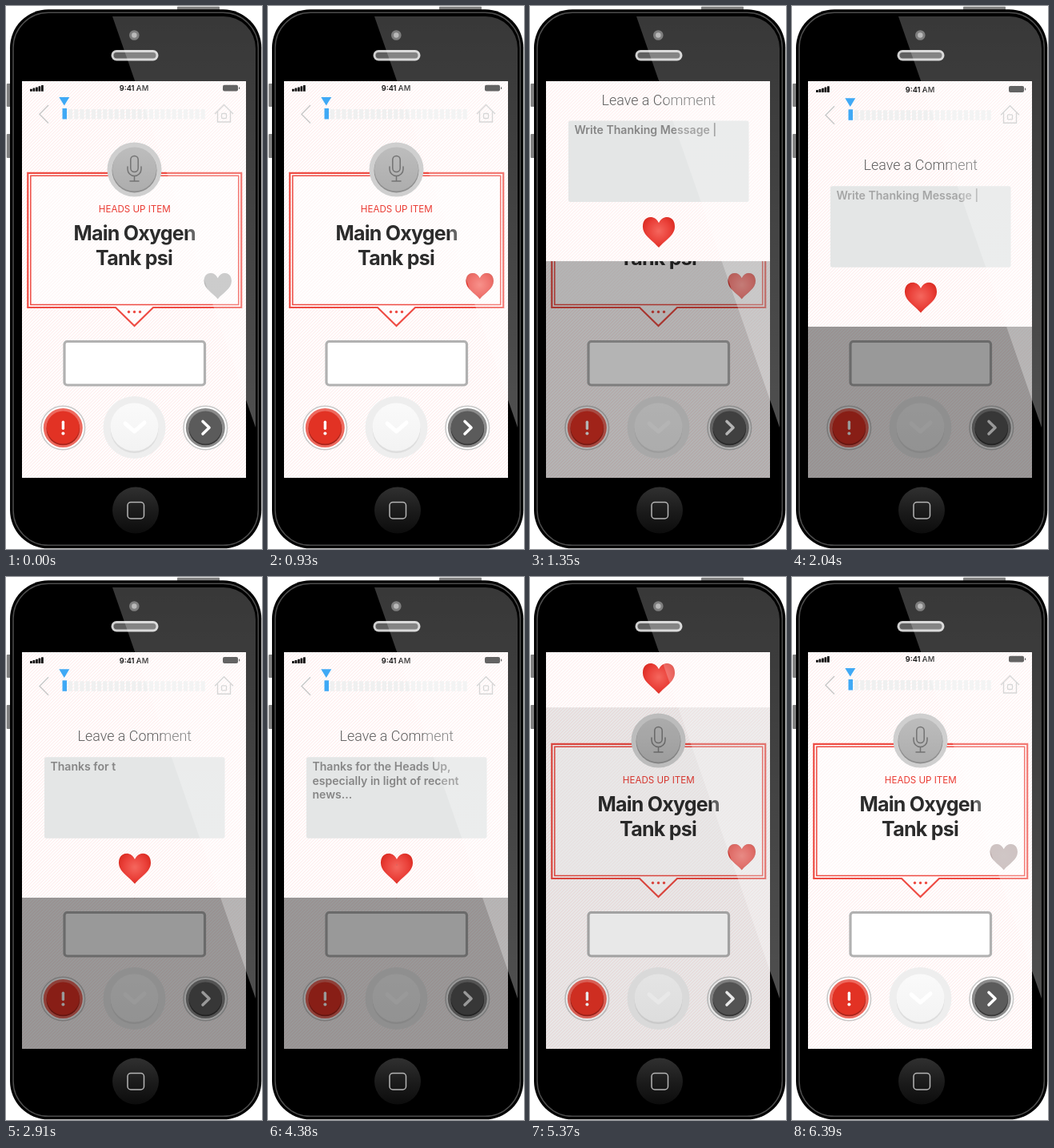
These frames come from a looping animation (320x679 px, 6570 ms). An HTML page with a canvas:

```html
<!DOCTYPE html>
<html lang="en">
<head>
<meta charset="utf-8">
<title>Thank-you comment</title>
<style>
  html, body { margin: 0; width: 100%; height: 100%; overflow: hidden; background: #fff; }
  canvas { display: block; width: 320px; height: 679px; }
</style>
</head>
<body>
<canvas id="stage" width="320" height="679"></canvas>
<script>
const ctx = document.getElementById('stage').getContext('2d');
const LOOP = 6570, TICK = 30;
const SCREEN = { x: 20, y: 94, w: 280, h: 496 };
const PANEL_BOTTOM = 401;
const HATCH_PITCH = 4;
const RED = '#ee4b43', BLUE = '#3fa9f5';
const PLACEHOLDER = 'Write Thanking Message |';
const MESSAGE = 'Thanks for the Heads Up,\nespecially in light of recent\nnews...';

const clamp = v => Math.min(1, Math.max(0, v));
const ramp = (t, from, to) => clamp((t - from) / (to - from));
const smooth = u => u * u * (3 - 2 * u);

function fillOrStroke(fill, stroke, width) {
  if (fill) { ctx.fillStyle = fill; ctx.fill(); }
  if (stroke) { ctx.strokeStyle = stroke; ctx.lineWidth = width; ctx.stroke(); }
}
function box(x, y, w, h, r, fill, stroke, width) {
  ctx.beginPath();
  ctx.roundRect(x, y, w, h, r);
  fillOrStroke(fill, stroke, width);
}
function disc(x, y, r, fill, stroke, width) {
  ctx.beginPath();
  ctx.arc(x, y, r, 0, Math.PI * 2);
  fillOrStroke(fill, stroke, width);
}
function poly(points, fill, stroke, width, closed) {
  ctx.beginPath();
  points.forEach(([x, y]) => ctx.lineTo(x, y));
  if (closed) ctx.closePath();
  fillOrStroke(fill, stroke, width);
}
function vertical(y0, y1, ...stops) {
  const g = ctx.createLinearGradient(0, y0, 0, y1);
  stops.forEach((c, i) => g.addColorStop(i / (stops.length - 1), c));
  return g;
}
function text(str, x, y, font, color, align = 'center', tracking = '0px') {
  ctx.font = font;
  ctx.letterSpacing = tracking;
  ctx.fillStyle = color;
  ctx.textAlign = align;
  ctx.fillText(str, x, y);
}

function hatchedPaper(bottom) {
  const { x, y, w } = SCREEN;
  ctx.save();
  ctx.beginPath();
  ctx.rect(x, y, w, bottom - y);
  ctx.clip();
  ctx.fillStyle = '#fffdfd';
  ctx.fillRect(x, y, w, bottom - y);
  ctx.beginPath();
  for (let c = x + y; c < x + w + bottom; c += HATCH_PITCH) {
    ctx.moveTo(c - y, y);
    ctx.lineTo(c - bottom, bottom);
  }
  fillOrStroke(null, 'rgba(238,75,67,.1)', 1);
  ctx.restore();
}

function heart(cx, top, w, h, fill) {
  const notch = top + h * .19;
  ctx.beginPath();
  for (const r of [w / 2, -w / 2]) {
    ctx.moveTo(cx, notch);
    ctx.bezierCurveTo(cx + r * .12, top + h * .06, cx + r * .3, top, cx + r * .52, top);
    ctx.bezierCurveTo(cx + r * .82, top, cx + r, top + h * .13, cx + r, top + h * .31);
    ctx.bezierCurveTo(cx + r, top + h * .6, cx + r * .38, top + h * .76, cx, top + h);
    ctx.closePath();
  }
  fillOrStroke(fill);
}
function redHeart(cx, top, w, h) {
  const g = ctx.createRadialGradient(cx, top + h * .45, 1, cx, top + h * .45, w * .58);
  g.addColorStop(0, '#f4645b');
  g.addColorStop(.6, '#ea4039');
  g.addColorStop(1, '#d9291f');
  heart(cx, top, w, h, g);
}

function header() {
  for (let i = 0; i < 5; i++) {
    const h = 3 + i * 1.2;
    box(30 + i * 3.5, 106.8 - h, 2.8, h, .5, '#111');
  }
  text('9:41 AM', 160, 106.3, '600 9.3px Inter, sans-serif', '#111');
  box(271, 98.8, 19, 7.8, 2, '#333');
  box(291, 101.3, 1.2, 2.8, .6, '#333');

  ctx.lineJoin = 'miter';
  poly([[53, 124], [42, 135.3], [53, 146.5]], null, '#c9c9c9', 1.5);
  poly([[66.3, 114], [79.3, 114], [72.8, 124.6]], BLUE, null, 0, true);
  box(70.5, 128, 5.5, 13.5, 0, BLUE);
  for (let i = 0; i < 24; i++) box(78 + i * 7.2, 129, 5.2, 12.5, 0, '#eff0f0');
  poly([[261, 135], [272.5, 123.5], [284, 135]], null, '#cacaca', 1.4);
  poly([[264.5, 132], [264.5, 145], [280.5, 145], [280.5, 132]], null, '#cacaca', 1.4);
  box(269.5, 134.5, 6, 6, 1, null, '#cacaca', 1.3);
}

function microphone() {
  const ink = '#737373';
  disc(160.5, 204.5, 34, '#cfcfcf');
  disc(160.5, 205.5, 28, '#8f8f8f');
  disc(160.5, 204, 27.5, vertical(176, 232, '#bdbdbd', '#adadad'));
  ctx.lineCap = 'round';
  box(155.8, 187.5, 9.4, 20, 4.7, null, ink, 1.5);
  ctx.beginPath();
  ctx.moveTo(152, 201);
  ctx.lineTo(152, 204);
  ctx.arc(160.5, 204, 8.5, Math.PI, 0, true);
  ctx.lineTo(169, 201);
  ctx.moveTo(160.5, 212.5);
  ctx.lineTo(160.5, 219);
  ctx.moveTo(155, 219);
  ctx.lineTo(166, 219);
  fillOrStroke(null, ink, 1.5);
  ctx.lineCap = 'butt';
}

function card() {
  ctx.lineJoin = 'miter';
  poly([[27.3, 208.8], [294.2, 208.8], [294.2, 377], [184, 377], [160.5, 400], [137, 377], [27.3, 377]],
    'rgba(255,255,255,.5)', RED, 2.2, true);
  box(30.8, 212.3, 259.9, 161.2, 0, null, RED, 1.5);
  for (const x of [153.5, 160.5, 167.5]) disc(x, 382.5, 1.7, RED);
  microphone();
  text('HEADS UP ITEM', 160.8, 258.3, '11.6px Inter, sans-serif', '#ea3a32');
  const title = '700 25px Inter, sans-serif';
  text('Main Oxygen', 160.6, 293, title, '#2c2c2c', 'center', '-0.03em');
  text('Tank psi', 160, 324, title, '#2c2c2c', 'center', '-0.03em');
}

function roundButton(x, halo, core, shade) {
  disc(x, 527.5, 27.3, '#fff', '#c9c9c9', 1.6);
  disc(x, 527.5, 24.5, halo);
  disc(x, 528.5, 20.8, shade);
  disc(x, 527, 20.5, core);
}

function controls() {
  box(73, 419.5, 175.5, 54.5, 3.5, '#fff', '#b1b1b1', 3.2);
  roundButton(71.3, '#ed6a5f', '#e23224', '#a8231a');
  box(69.7, 518.5, 3.4, 11.5, 1.7, '#fff');
  disc(71.4, 534.5, 2, '#fff');

  disc(160.5, 527, 39, '#eeeeee');
  disc(160.5, 529, 30, '#dedede');
  disc(160.5, 526.5, 30, vertical(496, 557, '#fafafa', '#f3f3f3'));
  ctx.lineCap = ctx.lineJoin = 'round';
  poly([[149, 522], [160.5, 532], [173, 521]], null, '#fff', 5);

  roundButton(249.3, '#8c8c8c', '#5b5b5b', '#383838');
  poly([[246, 519.5], [254, 527.3], [246, 535]], null, '#fff', 3.6);
  ctx.lineCap = 'butt';
}

function ripple(t, start, x, y) {
  const u = ramp(t, start, start + 420);
  if (u > 0 && u < 1) disc(x, y, 35 * smooth(Math.min(1, u * 1.2)), `rgba(120,120,120,${.35 * (1 - u)})`);
}

function likeAmount(t) {
  return t < 3000 ? ramp(t, 600, 930) : 1 - .91 * ramp(t, 6060, 6390);
}

function openAmount(t) {
  return t < 3000 ? smooth(ramp(t, 960, 1470) ** 1.54) : 1 - smooth(ramp(t, 5100, 5490));
}

function comment(t) {
  const font = '600 14.1px Inter, sans-serif', color = '#868686';
  if (t < 2100) {
    ctx.globalAlpha = 1 - ramp(t, 2010, 2100);
    text(PLACEHOLDER, 55.4, 242, font, color, 'left');
    ctx.globalAlpha = 1;
    return;
  }
  const typed = Math.round(MESSAGE.length * smooth(ramp(t, 2394, 4235)));
  MESSAGE.slice(0, typed).split('\n')
    .forEach((line, i) => text(line, 55.4, 242 + i * 17.5, font, color, 'left'));
}

function panel(t, open) {
  ctx.save();
  ctx.translate(0, (SCREEN.y - PANEL_BOTTOM) * (1 - open));
  hatchedPaper(PANEL_BOTTOM);
  ctx.save();
  ctx.translate(0, 1.3);
  header();
  ctx.restore();
  text('Leave a Comment', 160.8, 205.3, '300 17.9px Roboto, sans-serif', '#606060');
  box(48, 225.3, 225.5, 101.5, 2.5, '#e4e6e6');
  comment(t);
  redHeart(161, 345.8, 40, 38);
  ripple(t, 4380 - TICK, 161, 360);
  ctx.restore();
}

function app(t) {
  const { x, y, w, h } = SCREEN;
  ctx.save();
  ctx.beginPath();
  ctx.rect(x, y, w, h);
  ctx.clip();
  hatchedPaper(y + h);
  header();
  card();
  heart(264.7, 334, 34.5, 32.5, '#b8b8b8');
  ctx.globalAlpha = likeAmount(t);
  redHeart(264.7, 334, 34.5, 32.5);
  ctx.globalAlpha = 1;
  ripple(t, 330 - TICK, 263.5, 347.5);
  controls();

  const open = openAmount(t);
  if (open > 0) {
    ctx.fillStyle = `rgba(0,0,0,${.4 * open})`;
    ctx.fillRect(x, y, w, h);
    panel(t, open);
  }
  ctx.restore();
}

function phone() {
  box(214, .8, 53, 6, 1, '#808080');
  box(.8, 97, 6, 29, 1, '#808080');
  box(.8, 160, 6, 30, 1, '#808080');
  box(5, 4.3, 314.3, 674, 48, '#000');
  box(9, 8.3, 306.3, 666, 44, null, '#4c4c4c', 1.5);

  disc(160.3, 36.5, 6.3, '#595959');
  disc(160.3, 36.5, 3.2, '#a5a5a5');
  box(131.5, 55, 59, 13.5, 6.7, '#d0d0d0');
  box(134.5, 58, 53, 7.5, 3.7, '#606060');

  disc(162, 630.5, 29, vertical(601.5, 659.5, '#303030', '#1c1c1c', '#0c0c0c'));
  box(152, 620.5, 20.5, 20.5, 4, null, '#b5b5b5', 1.5);
}

function glare() {
  ctx.save();
  ctx.beginPath();
  ctx.roundRect(8, 13, 304, 658, 40);
  ctx.clip();
  poly([[133, 13], [312, 13], [312, 527]],
    vertical(13, 527, 'rgba(255,255,255,.22)', 'rgba(255,255,255,.31)'), null, 0, true);
  ctx.restore();
}

function draw(now) {
  const t = Math.floor((now % LOOP) / TICK) * TICK;
  ctx.fillStyle = '#fff';
  ctx.fillRect(0, 0, 320, 679);
  phone();
  app(t);
  glare();
}

let origin = null;
function loop(now) {
  origin ??= now;
  draw(now - origin);
  requestAnimationFrame(loop);
}
draw(0);
requestAnimationFrame(loop);
</script>
</body>
</html>
```
